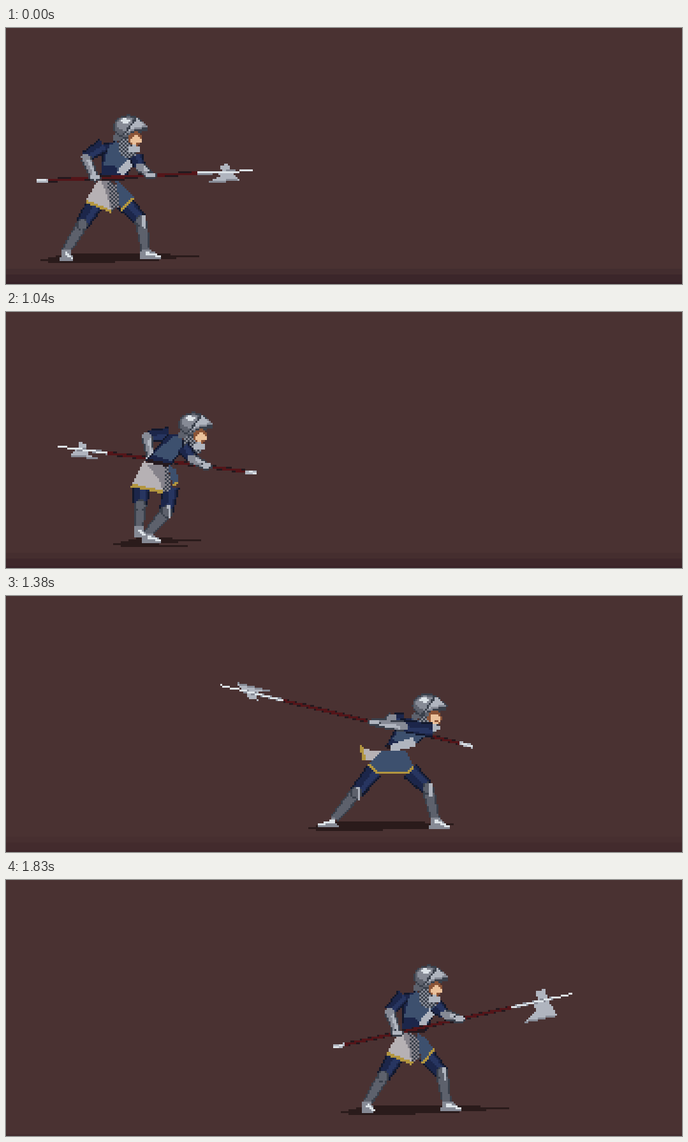
These frames come from a looping animation (1060x402 px, 2130 ms). An HTML page with a canvas:

```html
<!DOCTYPE html>
<html lang="en">
<head>
<meta charset="utf-8">
<title>Halberd knight</title>
<style>
html, body { margin: 0; width: 100%; height: 100%; overflow: hidden; background: #4a3232; }
canvas { display: block; width: 1062px; height: 402px; image-rendering: pixelated; }
</style>
</head>
<body>
<canvas id="stage" width="354" height="134"></canvas>
<script>
const ctx = document.getElementById('stage').getContext('2d');
const CELL = 3, LOOP = 2130, REST = 713, STEP = 55.5, LAST = 20;

const C = {
  bg: '#4a3232', shadow: '#2a1b1b', ink: '#12182c', navy: '#1c264a', navyHi: '#273560',
  blue: '#3d506e', steel: '#868a95', light: '#b0b5bf', white: '#dce2e7',
  iron: '#5d616c', edge: '#3a404b', cloth: '#b6b1b4', fold: '#85828a',
  gold: '#b3963f', skin: '#eac19b', brown: '#8b5437', red: '#541519', belt: '#24191e'
};

// Where the rear and front hand hold the pole, from butt (0) to tip (1).
const GRIP = { guard: [.27, .53], trail: [.53, .25], lunge: [.05, .13], sweep: [.36, .39] };

const key = (k, grip, waist, head, butt, tip, blade, feet = [51, -74]) =>
  ({ k, waist, head, butt, tip, blade, feet: feet.map(x => waist + x), grip: GRIP[grip] });
const KEYS = [
  key(-1, 'guard', 168, [195, 160], [48, 240], [386, 224], 14),
  key(0, 'guard', 167, [201, 163], [96, 200], [332, 262], -10),
  key(3, 'trail', 194, [241, 169], [332, 222], [45, 254], 12, [-96, 24]),
  key(8, 'trail', 308, [381, 199], [482, 299], [135, 146], 10, [66, -83]),
  key(9, 'lunge', 386, [440, 184], [470, 238], [816, 214], 22, [98, -132]),
  key(10, 'lunge', 592, [640, 180], [688, 216], [1025, 190], 20, [82, -86]),
  key(12, 'sweep', 615, [664, 177], [731, 236], [336, 140], -9, [58, -100]),
  key(17, 'sweep', 638, [682, 165], [707, 195], [420, 272], -9),
  key(20, 'guard', 640, [666, 157], [512, 263], [887, 179], 28)
];

const mix = (a, b, u) => Array.isArray(a) ? a.map((x, i) => mix(x, b[i], u)) : a + (b - a) * u;
const clamp = (x, a, b) => Math.min(b, Math.max(a, x));
const add = ([x, y], dx, dy) => [x + dx, y + dy];

// Hard-edged polygon; a second colour makes a checker.
function poly(pts, color, other) {
  const p = pts.map(([x, y]) => [x / CELL, y / CELL]);
  const ys = p.map(q => q[1]);
  const last = Math.ceil(Math.max(...ys) - .5);
  for (let y = Math.ceil(Math.min(...ys) - .5); y < last; y++) {
    const cy = y + .5, hits = [];
    p.forEach((a, i) => {
      const b = p[(i + 1) % p.length];
      if ((a[1] <= cy) !== (b[1] <= cy)) hits.push(a[0] + (cy - a[1]) / (b[1] - a[1]) * (b[0] - a[0]));
    });
    hits.sort((a, b) => a - b);
    for (let i = 0; i + 1 < hits.length; i += 2) {
      const x0 = Math.ceil(hits[i] - .5), x1 = Math.ceil(hits[i + 1] - .5);
      ctx.fillStyle = color;
      ctx.fillRect(x0, y, x1 - x0, 1);
      if (!other) continue;
      ctx.fillStyle = other;
      for (let x = x0; x < x1; x++) if ((x + y) & 1) ctx.fillRect(x, y, 1, 1);
    }
  }
}

function disc([x, y], rx, ry, color, other) {
  const turn = i => i * Math.PI / 8;
  poly(Array.from({ length: 16 }, (_, i) => [x + rx * Math.cos(turn(i)), y + ry * Math.sin(turn(i))]), color, other);
}

function band(p, q, w1, w2, color, shift = 0) {
  const d = Math.hypot(q[0] - p[0], q[1] - p[1]) || 1;
  const nx = -(q[1] - p[1]) / d, ny = (q[0] - p[0]) / d;
  const side = (o, w) => add(o, nx * w, ny * w);
  poly([side(p, shift + w1 / 2), side(q, shift + w2 / 2), side(q, shift - w2 / 2), side(p, shift - w1 / 2)], color);
}

function limb(p, q, w1, w2, line, fill, shine) {
  band(p, q, w1, w2, line);
  band(p, q, w1 - 5, w2 - 5, fill);
  band(p, q, w1 / 3, w2 / 3, shine, -w1 / 8);
}

// Middle joint of a two-part limb; straight when out of reach.
function joint(p, q, l1, l2, bend) {
  const dx = q[0] - p[0], dy = q[1] - p[1], d = Math.max(8, Math.hypot(dx, dy));
  if (d >= l1 + l2 || !bend) return mix(p, q, l1 / (l1 + l2));
  const a = (d * d + l1 * l1 - l2 * l2) / (2 * d);
  const reach = Math.sqrt(Math.max(0, l1 * l1 - a * a)), h = clamp(bend, -reach, reach);
  return [p[0] + (dx * a - dy * h) / d, p[1] + (dy * a + dx * h) / d];
}

function poseAt(k) {
  const i = KEYS.findLastIndex(p => p.k <= k);
  const a = KEYS[i], b = KEYS[i + 1] || a;
  const u = a === b ? 0 : (k - a.k) / (b.k - a.k);
  const pose = {};
  for (const name in a) pose[name] = mix(a[name], b[name], u);
  const { head, waist } = pose;
  const lift = n => Math.abs(a.feet[n] - b.feet[n]) > 40 ? 12 * Math.sin(Math.PI * u) : 0;
  const lean = clamp((head[0] - waist - 27) / 46, 0, 1);
  const sweep = k > 10 && k < 19;
  return Object.assign(pose, {
    lean, sweep, waist: [waist, 239], spun: sweep && k < 15, behind: k > 1 && k < 19,
    turn: 25 * clamp(Math.min(k, 11 - k) / 3, 0, 1),
    feet: pose.feet.map((x, n) => [x, 350 - lift(n)]).sort((p, q) => p[0] - q[0]),
    back: add(head, -42, 24 - 28 * lean * lean),
    front: add(head, sweep ? 5 : 8 - 42 * lean, 40 - 14 * lean),
    neck: add(head, -23, 18 - 10 * lean)
  });
}

function shadow({ feet, butt, tip }) {
  const l = feet[0][0] - 40, toe = feet[1][0];
  const r = Math.max(toe + 30, (toe + Math.max(butt[0], tip[0])) / 2);
  for (let i = 0; i < 5; i++) {
    const y = 356 + i * 3, x0 = l + 12 * Math.abs(3 - i), x1 = [r - 45, r, r - 35, toe + 20, l + 116][i];
    band([x0, y + .5], [x1, y + .5], 3, 3, C.shadow);
  }
}

function halberd({ butt, tip, blade }) {
  const at = (u, y = 0) => add(mix(tip, butt, u), 0, y);
  const rod = (u, v, h, color) => poly([at(u, -h / 2), at(v, -h / 2), at(v, h / 2), at(u, h / 2)], color);
  const hook = -(blade * .4 + 6 * Math.sign(blade));
  rod(.25, .96, 6, C.belt);
  rod(.25, .96, 4, C.red);
  rod(.95, 1, 6, C.light);
  rod(.96, 1, 3, C.white);
  poly([at(.1), at(.06, blade), at(.2, blade), at(.15, blade / 2), at(.16)], C.light);
  band(at(.07, blade), at(.2, blade), 3, 3, C.steel);
  poly([at(.1), at(.11, hook), at(.15, hook), at(.14)], C.light);
  rod(.08, .25, 5, C.steel);
  rod(0, .25, 3, C.white);
}

function leg({ waist, feet, spun }, isFront) {
  const foot = feet[+isFront], hip = add(waist, isFront ? 18 : spun ? -37 : -27, 35);
  const knee = joint(hip, foot, 44, 52, isFront ? -12 : spun ? 12 : 0);
  const toe = isFront ? 23 : spun ? -25 : 11, heel = -9 * Math.sign(toe);
  const sole = foot[1] + (isFront === spun ? 16 : 12);
  limb(hip, knee, 29, 22, C.ink, C.navy, C.navyHi);
  limb(knee, foot, 20, 15, C.edge, C.iron, C.iron);
  disc(knee, 9, 10, C.edge);
  disc(knee, 7, 8, C.iron);
  if (isFront || spun) band(add(knee, 4, -9), add(knee, 5, 12), 6, 4, C.light);
  const [x, y] = foot;
  poly([[x - 7, y - 3], [x + 7, y - 3], [x + toe, sole - 3], [x + toe, sole], [x + heel, sole]], C.steel);
  band([x, y + 3], [x + toe, sole - 3], 5, 3, C.white);
}

function skirt({ waist, turn, spun, lean }) {
  const at = (x, y) => add(waist, x, y);
  if (spun) {
    poly([at(-60, -4), at(-53, 18), at(-25, 18), at(-18, 4), at(-45, 3)], C.cloth);
    band(at(-59, -5), at(-53, 18), 5, 5, C.gold);
    const [l, a, b, r] = [at(-47, 24), at(-34, 39), at(16, 39), at(24, 29)];
    poly([at(-24, 4), at(12, 4), r, b, a, l], C.blue);
    [[l, a], [a, b], [b, r]].forEach(([p, q]) => band(p, q, 4, 4, C.gold));
    return;
  }
  const drop = 49 - 8 * lean, fringe = turn * .4;
  const l = at(-43, 33), r = at(-3 + fringe, drop), top = at(-9 + turn * .8, 0);
  const side = at(32, 27), low = at(12 + fringe, drop - fringe);
  poly([at(4 + fringe, 0), at(17 + fringe, 9), side, low], C.blue);
  poly([top, at(6 + fringe, 8), at(10 + fringe, 40), r], C.edge, C.fold);
  poly([at(-24, -6 * lean), top, r, l], C.cloth);
  poly([at(-20, 0), top, r, at(-9 + fringe, 24)], C.fold);
  band(l, r, 5, 5, C.gold);
  band(low, side, 4, 4, C.gold);
}

function torso({ waist, lean, spun, sweep, back, neck, front }) {
  const tilt = 10 * lean * lean;
  const l = add(waist, -18, -1 - tilt), r = add(waist, 17, -3 + tilt);
  poly([add(back, -2, -2), neck, add(front, 5, 0), add(r, 2, 0), add(l, -2, 0)], C.ink);
  poly([back, neck, front, r, l], C.navy);
  poly([add(back, 8, 2), neck, front, mix(front, r, .8), mix(back, l, .75)], C.blue);
  if (lean < .2 && !sweep) {
    poly([mix(back, l, .6), add(waist, 2, -22), r, l], C.navy);
    band(add(front, -5, 8), add(waist, 10, -10), 11, 11, C.light);
  }
  band(l, r, 6, 6, C.belt);
  if (spun) band(add(waist, -12, 0), add(waist, 26, -10), 11, 15, C.light);
}

function helmet(h) {
  const at = (x, y) => add(h, x, y);
  disc(at(-3, 27), 16, 17, C.edge, C.steel);
  band(at(-8, 2), at(-26, 15), 18, 9, C.iron);
  disc(at(-3, -5), 24, 19, C.edge);
  disc(at(-4, -5), 21, 16, C.iron);
  disc(at(-6, -9), 15, 11, C.steel);
  disc(at(-8, -14), 7, 4, C.white);
  disc(at(8, 14), 11, 12, C.brown);
  disc(at(9, 16), 8, 8, C.skin);
  band(at(8, 21), at(15, 21), 3, 3, C.brown);
  disc(at(6, 30), 10, 6, C.light);
  poly([at(-13, 9), at(9, -21), at(28, -6), at(26, 3), at(8, 3)], C.edge);
  poly([at(-8, 7), at(11, -19), at(27, -5), at(7, 0)], C.steel);
  poly([at(-4, 2), at(11, -19), at(24, -7), at(6, -3)], C.light);
}

function arm(shoulder, hand, bend) {
  const elbow = joint(shoulder, hand, 34, 36, bend);
  limb(shoulder, elbow, 24, 19, C.ink, C.navy, C.navyHi);
  limb(elbow, hand, 18, 13, C.edge, C.steel, C.light);
  disc(elbow, 7, 6, C.steel);
  disc(hand, 10, 6, C.edge);
  disc(add(hand, 0, -1), 8, 4, C.light);
}

function knight(p) {
  const [backHand, frontHand] = p.grip.map(g => mix(p.butt, p.tip, g));
  const rearLayer = () => {
    halberd(p);
    arm(p.back, backHand, p.sweep ? 6 : 27);
  };
  if (p.behind) rearLayer();
  leg(p, true);
  leg(p, false);
  skirt(p);
  torso(p);
  helmet(p.head);
  if (!p.behind) rearLayer();
  arm(p.front, frontHand, frontHand[0] < p.front[0] ? -5 : 5);
}

function backdrop(k) {
  const rect = (y, color) => {
    ctx.fillStyle = color;
    ctx.fillRect(0, y / CELL, 354, 134);
  };
  const dark = a => `rgba(28, 12, 24, ${a})`, depth = clamp(1 - k / LAST, 0, 1);
  rect(0, C.bg);
  rect(378, dark(.13 * depth));
  rect(387, dark(.2 * depth));
  rect(399, dark(.12));
}

let shown = null;
function frame() {
  const t = performance.now() % LOOP;
  const k = clamp(Math.floor((t - REST) / STEP), -1, LAST);
  if (k !== shown) {
    shown = k;
    const pose = poseAt(k);
    backdrop(k);
    shadow(pose);
    knight(pose);
  }
  requestAnimationFrame(frame);
}
frame();
</script>
</body>
</html>
```
